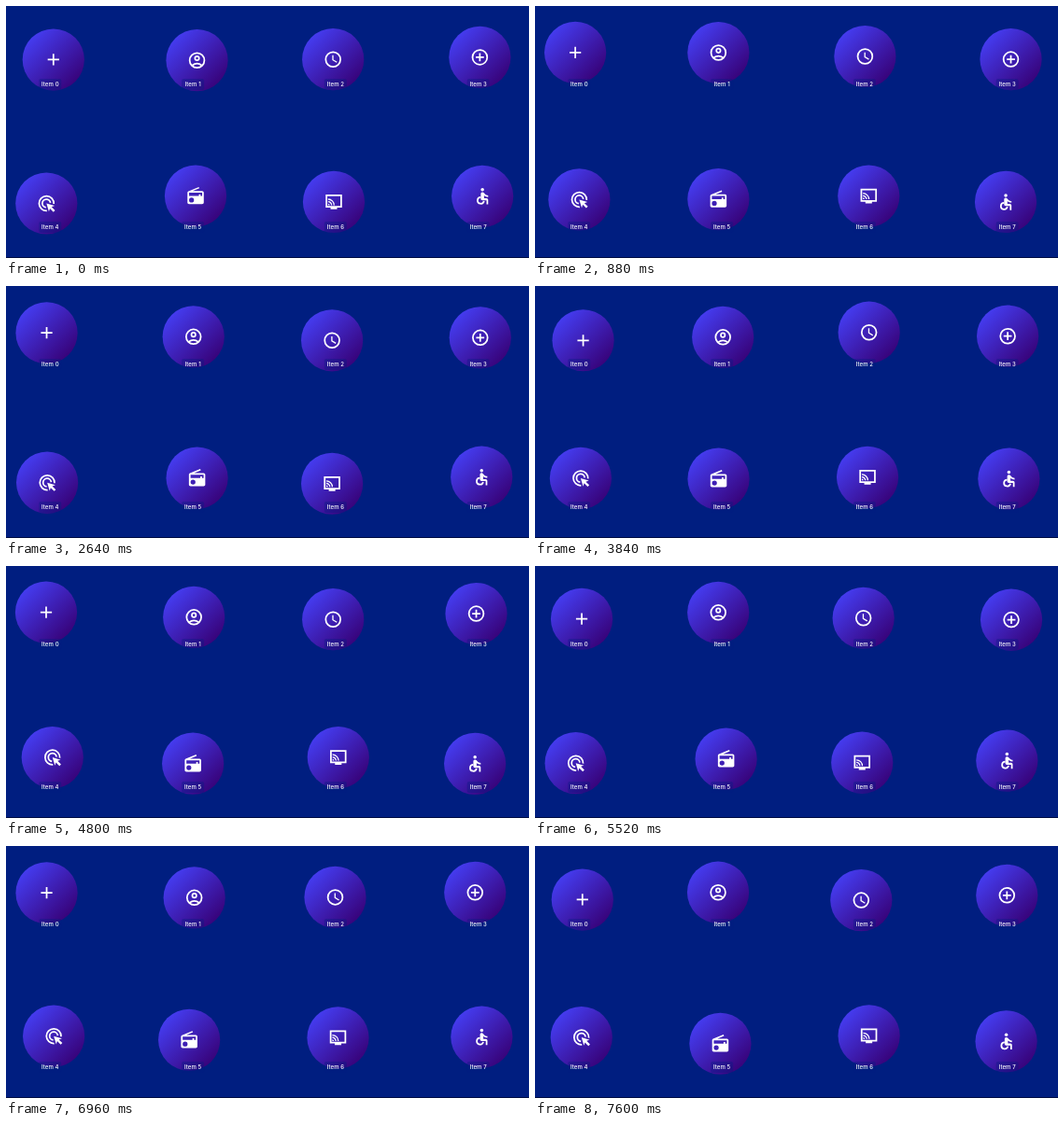
An HTML page that plays this animation: 560 px wide and 270 px high, repeating every 7680 ms.

```html
<!DOCTYPE html>
<html lang="en">
<head>
<meta charset="utf-8">
<title>Floating items</title>
<style>
  html, body { margin: 0; width: 100%; height: 100%; overflow: hidden; background: #001e80; }
  svg { display: block; }
  text { font: 500 6px Inter, Roboto, sans-serif; fill: #fff; text-anchor: middle; letter-spacing: .1px; }
  .icon { fill: #fff; }
  .line { fill: none; stroke: #fff; stroke-width: 2; }
  .label { fill: #001e80; fill-opacity: .35; }
</style>
</head>
<body>
<svg id="stage" width="560" height="270" viewBox="0 0 560 270">
  <defs>
    <linearGradient id="ball" x1="0" y1="0" x2="1" y2="1">
      <stop offset=".1" stop-color="#453ff6"/>
      <stop offset=".9" stop-color="#370074"/>
    </linearGradient>
  </defs>
  <rect y="269" width="560" height="1" fill="#000c40"/>
</svg>
<script>
const LOOP = 7680, STEP = 80, AMP = 4.3;
const fill = d => `<path class="icon" d="${d}"/>`;
const line = (d, w = 2) => `<path class="line" d="${d}" style="stroke-width:${w}"/>`;
const ring = '<circle class="line" cx="12" cy="12" r="9"/>';

// Icons on a 24 unit grid; px and py are the times (s) of the rightmost and lowest point
const items = [
  { px: 1.8, py: 1.8, icon: line('M5 12h14M12 5v14') },
  { px: 2.12, py: 2.12, icon: ring + '<circle class="line" cx="12" cy="9.5" r="2.5"/>' +
      line('M6 18.3Q12 13.7 18 18.3') },
  { px: 1.48, py: .28, icon: ring + line('M11.75 7v5.6l4.9 2.95', 1.5) },
  { px: .56, py: .56, icon: ring + line('M7 12h10M12 7v10') },
  { px: 1.57, py: .17, icon: line('M20.97 12.6A9 9 0 1 0 12.6 20.97M16.9 11.4A5 5 0 1 0 11.4 16.9') +
      fill('M18.23 16.26L22 15 12 12l3 10 1.26-3.77 4.27 4.27 1.98-1.98z') },
  { px: 2.57, py: 1.68, icon: fill('M3.24 6.15C2.51 6.43 2 7.17 2 8v12c0 1.1.89 2 2 2h16c1.11 0 2-.9 2-2V8' +
      'c0-1.11-.89-2-2-2H8.3l8.26-3.34L15.88 1zM7 20a3 3 0 1 1 0-6 3 3 0 0 1 0 6zm13-8h-2v-2h-2v2H4V8h16z') },
  { px: 1.1, py: 2.7, icon: line('M3 4h18v14H3z') + fill('M8 18h8v3H8zM5 14v2h2a2 2 0 0 0-2-2z') +
      line('M5 11.7A4.3 4.3 0 0 1 9.3 16M5 8.7A7.3 7.3 0 0 1 12.3 16', 1.45) },
  { px: 3.11, py: 1.41, icon: '<circle class="icon" cx="12" cy="4" r="2"/>' +
      fill('M19 13v-2c-1.54.02-3.09-.75-4.07-1.83l-1.29-1.43c-.5-.5-1.1-.77-1.83-.72C10.76 7.11 10 8.04 10 9.09V15' +
      'c0 1.1.9 2 2 2h5v5h2v-5.5c0-1.1-.9-2-2-2h-3v-3.45c1.29 1.07 3.25 1.94 5 1.95z') +
      line('M10 13.1A4 4 0 1 0 13.9 18') }
];

const stage = document.getElementById('stage');
items.forEach((item, i) => {
  const col = i % 4, row = i >> 2, labelX = 47.3 + 152.8 * col, labelY = 84 + 153 * row;
  item.x = 47.3 + 153.05 * col;
  item.y = 54 + 153.5 * row;
  item.period = 2 + .2 * i;
  stage.insertAdjacentHTML('beforeend', `
    <g class="ball">
      <circle r="33.1" fill="url(#ball)"/>
      <g transform="scale(.875) translate(-12 -12)">${item.icon}</g>
    </g>
    <rect class="label" x="${labelX - 12}" y="${labelY - 6}" width="24" height="12" rx="2"/>
    <text x="${labelX}" y="${labelY + 2.1}">Item ${i}</text>`);
  item.node = stage.querySelectorAll('.ball')[i];
});

const start = performance.now();
function draw(now) {
  const elapsed = Math.max(0, now - start) % LOOP;
  const t = Math.floor(elapsed / STEP) * STEP / 1000;
  for (const { node, x, y, px, py, period } of items) {
    const sway = peak => AMP * Math.cos(2 * Math.PI * (t - peak) / period);
    node.setAttribute('transform', `translate(${x + sway(px)} ${y + sway(py)})`);
  }
  requestAnimationFrame(draw);
}
draw(start);
</script>
</body>
</html>
```
